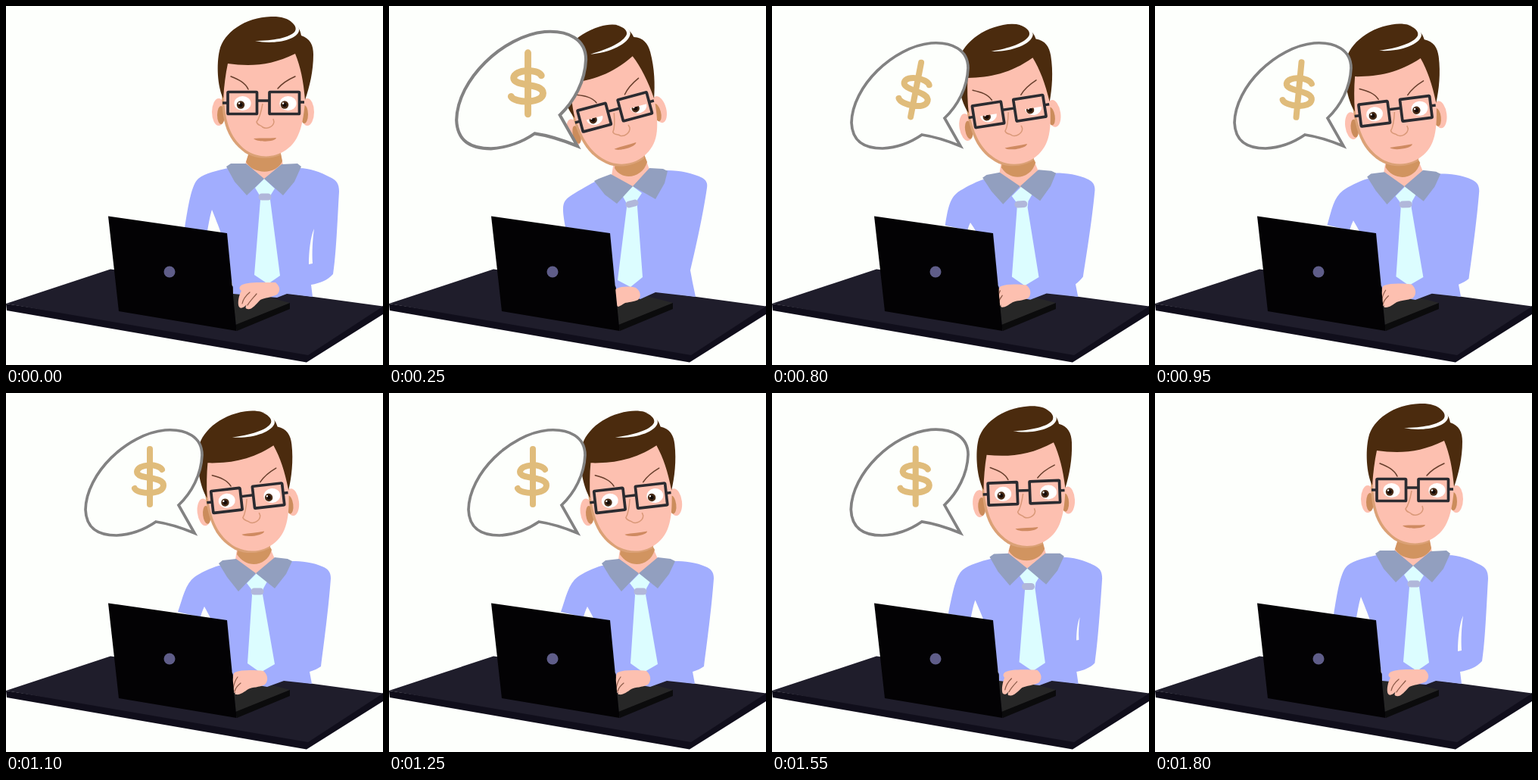
An HTML page that plays this animation: 498x474 px, repeating every 1850 ms.

```html
<!DOCTYPE html>
<html lang="en">
<head>
<meta charset="utf-8">
<title>Thinking about money</title>
<style>
  html, body { margin: 0; width: 100%; height: 100%; overflow: hidden; background: #fdfffc; }
  svg { display: block; width: 100vw; height: 100vh; }
</style>
</head>
<body>
<svg viewBox="0 0 498 474">
  <path fill="#100e1b" d="M0 393L1 402L397 470.500L498 407L498 396L400 455Z"/>
  <path fill="#1f1d2b" d="M0 393L138 347.500L498 396.500L399 461Z"/>
  <path fill="#272727" d="M298 372L375 392L304 423Z"/>
  <path fill="#0b0b0c" d="M375 392V400L305 429L303 421Z"/>

  <path id="torso" fill="#a1adfe"/>
  <path id="gap" fill="#fdfffc"/>
  <path id="neck" fill="#fdc0b0"/>
  <path id="shade" fill="#d19460"/>
  <path id="tie" fill="#dcfdff"/>
  <path id="knot" fill="none" stroke="#b1b7da" stroke-width="9" stroke-linecap="round"/>
  <path id="collar" fill="#929fbf"/>
  <path id="hand" fill="#fdc0b0"/>
  <path id="fingers" fill="none" stroke="#8b5a48" stroke-width="1.2" stroke-linecap="round"/>

  <path fill="#030204" d="M135 277.500L292 300L304.500 429L149 403Z"/>
  <circle cx="216" cy="351" r="7.500" fill="#5f5d89"/>

  <g id="head">
    <g fill="#fdc0b0">
      <ellipse cx="281" cy="140" rx="9" ry="18"/>
      <ellipse cx="398" cy="140" rx="9" ry="18"/>
    </g>
    <g fill="#cb8c5b">
      <ellipse cx="284" cy="144" rx="5" ry="12"/>
      <ellipse cx="394" cy="143" rx="5" ry="12"/>
    </g>
    <path fill="#dba176" d="M286 90C282 150 290 175 316 194C332 203 350 202 362 197L392 90Z"/>
    <path fill="#fdc0b0" d="M289 60C284 140 290 170 318 191C334 201 354 201 370 190C388 178 394 155 396 110L389 60Z"/>
    <path fill="#4b2b0e" d="M287 122C279 106 278 76 282 59C287 35 316 15 350 14C373 13 388 24 390 39C402 43 406 52 406 64C406 86 401 107 395 124C393 99 389 80 382 63C350 79 322 80 293 76C290 90 288 106 287 122Z"/>
    <path fill="#fdfffc" d="M329 46C352 51 383 46 387 33C388 26 381 20 371 17C378 21 385 27 382 33C376 42 352 46 329 46Z"/>
    <g fill="none" stroke="#673e2c" stroke-width="1.500" stroke-linecap="round">
      <path d="M297 93C307 97 316 101 320 110"/>
      <path d="M382 93C373 97 364 103 359 109"/>
    </g>
    <g id="eyes"></g>
    <path fill="none" stroke="#d99878" stroke-width="1.500" d="M339 129C337 140 335 148 331 153C332 158 337 157 339 160C344 163 353 160 354 153L353 149"/>
    <path fill="#cf8a61" d="M327 175C337 174 347 175 357 174C356 180 331 180 327 175Z"/>
    <g fill="none" stroke="#2b2b30" stroke-width="3.700">
      <rect x="293" y="113.500" width="38.500" height="29" rx="1"/>
      <rect x="348" y="113.500" width="39.500" height="29" rx="1"/>
      <path d="M332 125H348M286 128H293M388 127H394" stroke-width="3.500"/>
    </g>
  </g>

  <g id="bubble">
    <path fill="#fdfffc" stroke="#828282" stroke-width="3.700" d="M249 185L228 148C245 132 258 108 259 82C259 58 238 47 210 49C160 54 106 106 105 154C106 180 123 188 146 188C166 187 185 179 198 170C212 172 232 178 249 185Z"/>
    <g id="dollar" fill="none" stroke="#e0bc7b" stroke-width="8" stroke-linecap="round">
      <path d="M190 74V147"/>
      <path d="M206 101C202 93 174 93 173 104C173 115 208 109 208 122C208 135 174 134 170 126"/>
    </g>
  </g>
</svg>
<script>
const LOOP = 1850, STEP = 50;
const $ = id => document.getElementById(id);

// Each shape in three poses: upright, leaning, settled.
const shapes = {
  torso: [
    'M293 214C280 217 262 221 254 228C245 236 241 262 236 293L266 297C268 285 270 275 272 269C276 279 281 291 284 300L300 372L300 380L358 385L371 380L405 384L403 368C415 366 425 362 432 354C436 330 438 280 440 245C440 235 437 231 430 227C415 219 400 214 388 214Z',
    'M272 232C262 237 247 246 238 252C229 259 228 264 233 292L262 296C262 296 262 296 262 296C264 297 266 297 268 298L300 372L300 380L332 387L352 378L405 384L401 365C400 360 399 354 398 349C405 320 415 275 420 240C421 234 419 230 414 227C402 221 385 217 367 217Z',
    'M281 228C270 231 256 238 249 243C237 252 234 269 227 289L257 296C258 291 260 286 262 282C265 287 268 293 271 299L300 372L300 380L345 388L367 380L404 384L401 368C407 366 412 364 416 361C420 330 426 285 429 245C429 237 426 233 420 230C405 223 390 222 378 222Z'],
  gap: [
    'M407 294C402 305 400 325 400 341L405 340C404 325 405 308 407 294Z',
    'M405 300C405 300 405 300 405 300L405 300C405 300 405 300 405 300Z',
    'M406 300C406 300 406 300 406 300L406 300C406 300 406 300 406 300Z'],
  neck: [
    'M322 190L362 190L366 210L342 230L316 209Z',
    'M298 200L337 196L344 216L322 240L294 224Z',
    'M306 200L347 200L355 219L331 240L303 220Z'],
  shade: [
    'M322 190L362 190L365 205C357 223 327 223 317 206Z',
    'M300 200L337 196L341 206C335 227 308 232 298 214Z',
    'M307 200L347 200L351 207C345 229 318 233 305 213Z'],
  tie: [
    'M341 228L329 240L335 250L336 256L328 355L346 367L362 356L349 256L350 249L355 241Z',
    'M322 238L308 250L313 259L314 266L302 362L319 371L335 358L328 265L328 256L334 247Z',
    'M331 238L318 251L324 259L325 267L319 357L336 369L355 358L339 266L340 258L345 249Z'],
  knot: ['M338 252L346 252', 'M317 262L325 260', 'M328 262L336 262'],
  collar: [
    'M291 212L297 208L317 208L341 228L318 250L302 232ZM341 228L364 209L385 208L390 212L381 232L366 250Z',
    'M271 231L277 228L293 222L322 238L301 261L285 249ZM322 238L344 214L362 215L368 218L364 234L352 255Z',
    'M281 225L286 221L304 219L330 238L307 262L292 243ZM330 238L355 217L372 219L378 222L370 239L355 258Z'],
  hand: [
    'M356 365C362 370 363 376 358 381C350 385 342 385 336 388C330 394 324 402 319 400C316 400 316 397 318 394C313 400 308 400 307 395C306 388 309 379 311 376C308 374 307 371 312 368C320 364 340 365 356 365Z',
    'M326 372C332 376 334 383 329 388C322 391 316 391 312 392C308 394 306 396 303 397C302 397 301 396 301 395C300 397 299 397 299 395C298 388 298 380 299 376C299 375 299 374 301 373C308 370 318 370 326 372Z',
    'M340 367C346 372 347 380 342 385C334 389 326 388 320 391C314 395 309 399 304 398C302 398 302 396 304 393C302 397 300 397 299 395C298 388 299 380 300 376C300 373 300 371 302 369C312 365 328 366 340 367Z'],
  fingers: [
    'M322 378C316 383 313 388 312 393M331 380C326 386 322 390 319 395',
    'M290 378C290 383 290 388 290 393M290 380C290 386 290 390 290 395',
    'M306 375C302 380 301 385 300 390M310 383C305 387 303 390 302 394']
};
// Head centre x, y and tilt.
const headPoses = [[340, 128, 0], [298, 140, -15], [319, 138.7, -6.5]];

const lerp = (a, b, u) => a + (b - a) * u;
const ease = u => u * u * (3 - 2 * u);
const easeOut = u => u * (2 - u);
const number = /-?[\d.]+/g;

function morph(from, to, u) {
  const ends = to.match(number);
  let i = 0;
  return from.replace(number, n => lerp(+n, +ends[i++], u).toFixed(2));
}

function track(keys, t) {
  const i = keys.findIndex(k => k[0] > t);
  if (i < 0) return keys[keys.length - 1][1];
  const [t0, v0] = keys[i - 1], [t1, v1] = keys[i];
  return lerp(v0, v1, ease((t - t0) / (t1 - t0)));
}

// Two poses and the progress between them.
function poseAt(t) {
  if (t < 250) return [0, 1, t / 250];
  if (t < 1100) return [1, 2, (t - 250) / 850];
  return [2, 0, Math.min(1, Math.max(0, (t - 1400) / 250))];
}

function bubbleScale(t) {
  if (t < 1300) return track([[0, 0], [250, 1.11], [450, 0.96], [600, 1]], t);
  const u = Math.min(1, (t - 1300) / 400);
  return Math.max(0, 1 - u * u * (2.7 * u - 1.7));
}

$('eyes').innerHTML = [[312.5, 310], [372.5, 368]].map(([x, pupil]) => `
  <ellipse cx="${x}" cy="128.5" rx="11" ry="9.5" fill="#fff"/>
  <circle cx="${pupil}" cy="130.500" r="5.200" fill="#4a2d18"/>
  <circle cx="${pupil}" cy="130.500" r="2.800" fill="#160c08"/>
  <circle cx="${pupil - 2}" cy="128.500" r="1.200" fill="#fff"/>
  <rect class="lid" x="${x - 14}" y="117" width="28" height="0" fill="#fdc0b0"/>`).join('');
const lids = document.querySelectorAll('.lid');

function draw(t) {
  const [a, b, progress] = poseAt(t);
  const u = ease(progress);
  for (const id in shapes) {
    // The tie swings ahead of the body.
    const amount = id === 'tie' ? easeOut(progress) : u;
    $(id).setAttribute('d', morph(shapes[id][a], shapes[id][b], amount));
  }

  const [x, y, tilt] = headPoses[a].map((v, i) => lerp(v, headPoses[b][i], u));
  $('head').setAttribute('transform', `translate(${x} ${y}) rotate(${tilt}) translate(-340 -128)`);

  const lid = track([[0, 0], [150, 0], [250, 11.5], [350, 0], [700, 0], [800, 11.5], [900, 0]], t);
  lids.forEach(el => el.setAttribute('height', lid));

  $('bubble').setAttribute('transform', `translate(249 185) scale(${bubbleScale(t)}) translate(-249 -185)`);
  const swing = track([[0, 0], [250, 0], [450, 12], [800, 11], [1100, 0]], t);
  $('dollar').setAttribute('transform', `rotate(${swing} 190 111)`);
}

let start;
function tick(now) {
  start ??= now;
  const t = (now - start) % LOOP;
  draw(Math.floor(t / STEP) * STEP);
  requestAnimationFrame(tick);
}
draw(0);
requestAnimationFrame(tick);
</script>
</body>
</html>
```
